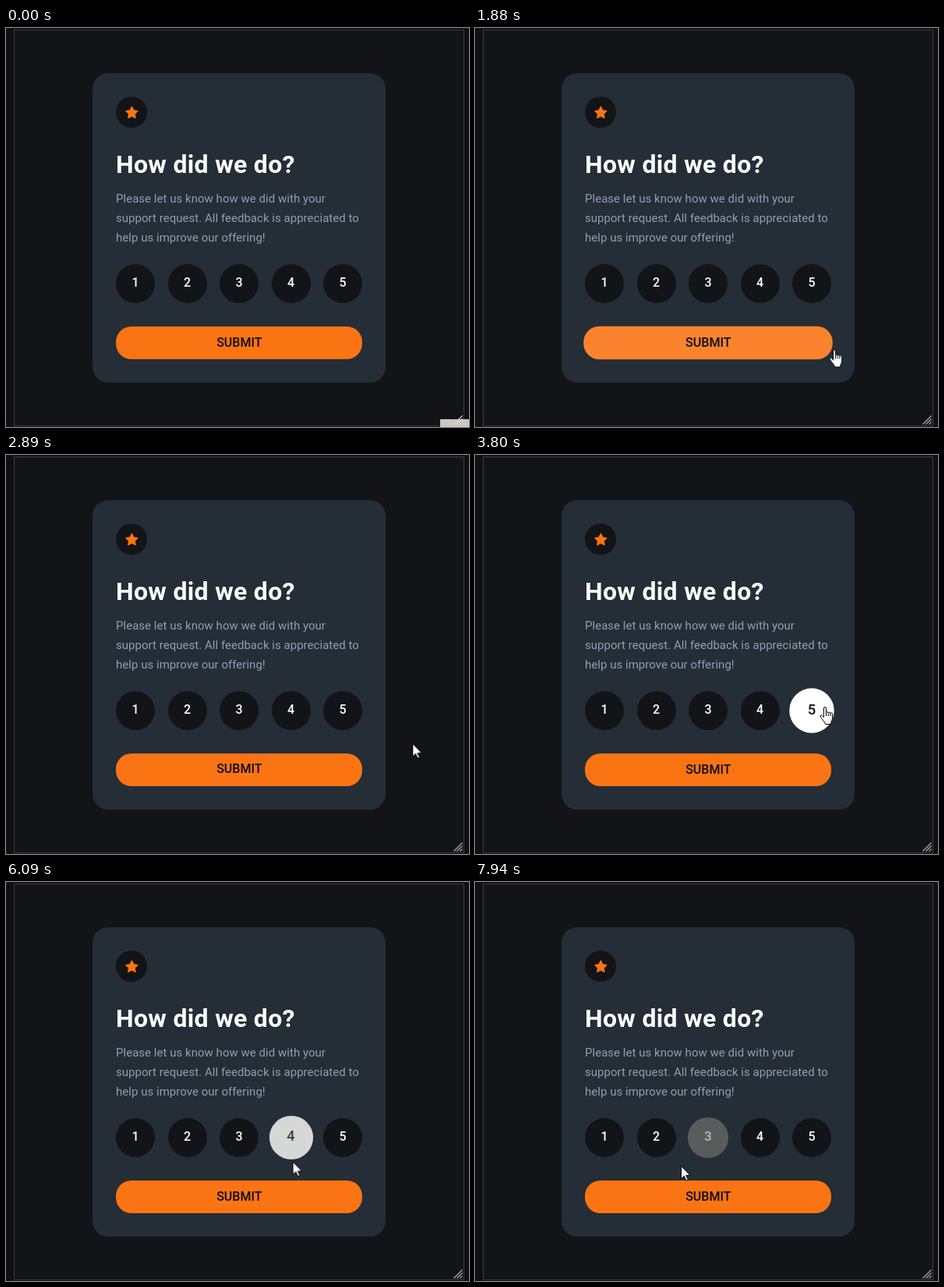
Write an HTML page that moves like this. It is 594 by 512 pixels and loops after 8000 ms.

```html
<!DOCTYPE html>
<html lang="en">
<head>
<meta charset="utf-8">
<title>Rating card</title>
<style>
  @property --hot { syntax: "<number>"; inherits: true; initial-value: 0; }
  @property --hand { syntax: "<number>"; inherits: true; initial-value: 0; }

  :root { --dark: #121417; --orange: #fb7413; --loop: 8s linear infinite; }
  html, body { margin: 0; width: 100%; height: 100%; overflow: hidden; background: #0f1013; }
  svg { display: block; }
  text { font-family: Roboto, "Open Sans", sans-serif; }

  .title { font-size: 32px; font-weight: 700; letter-spacing: .3px; fill: #fff; }
  .copy { font-size: 15px; letter-spacing: .03px; fill: #939db1; }

  .btn {
    --grow: .15; --base: var(--dark); --ink: #fff;
    transform-box: fill-box; transform-origin: center;
    transform: scale(calc(1 + var(--grow) * var(--hot)));
  }
  .btn rect, .btn circle { fill: color-mix(in srgb, #fff calc(var(--hot) * 100%), var(--base)); }
  .btn text {
    font-size: 16px; font-weight: 500; text-anchor: middle;
    fill: color-mix(in srgb, var(--dark) calc(var(--hot) * 100%), var(--ink));
  }
  .submit { --grow: .1; --base: var(--orange); --ink: #0c0d0f; animation: hot-submit var(--loop); }
  .five { animation: hot-five var(--loop); }
  .four { animation: hot-four var(--loop); }
  .three { animation: hot-three var(--loop); }

  /* each hover eases in and out over about 300 ms */
  @keyframes hot-submit {
    0% { --hot: 0; }
    23.1% { --hot: 0; animation-timing-function: ease; }
    26.85% { --hot: 1; }
    32.6% { --hot: 1; animation-timing-function: ease; }
    36.35%, 100% { --hot: 0; }
  }
  @keyframes hot-five {
    0% { --hot: 0; }
    43.5% { --hot: 0; animation-timing-function: ease; }
    47.25% { --hot: 1; }
    56.2% { --hot: 1; animation-timing-function: ease; }
    59.95%, 100% { --hot: 0; }
  }
  @keyframes hot-four {
    0% { --hot: 0; }
    63.6% { --hot: 0; animation-timing-function: ease; }
    67.1% { --hot: 1; }
    75.6% { --hot: 1; animation-timing-function: ease; }
    79.35%, 100% { --hot: 0; }
  }
  @keyframes hot-three {
    0% { --hot: 0; }
    84.63% { --hot: 0; animation-timing-function: ease; }
    87.9% { --hot: 1; }
    97.65% { --hot: 1; }
    99.25%, 100% { --hot: .3; }
  }

  .patch { animation: patch var(--loop); }
  @keyframes patch {
    0%, .8% { opacity: 1; }
    3.4%, 100% { opacity: 0; }
  }

  .cursor { animation: move var(--loop), swap 8s step-end infinite; }
  .arrow { opacity: calc(1 - var(--hand)); }
  .hand { opacity: var(--hand); }
  @keyframes move {
    0%, 6.6% { transform: translate(596px, 513px); }
    7% { transform: translate(588px, 506px); }
    10.2% { transform: translate(566px, 446px); }
    13.4%, 15.9% { transform: translate(552px, 405px); }
    16.6%, 17.4% { transform: translate(541px, 410px); }
    20.5% { transform: translate(505px, 415px); }
    23.1% { transform: translate(463px, 413px); }
    26.1%, 31.4% { transform: translate(449px, 409px); }
    32.6% { transform: translate(471px, 406px); }
    35% { transform: translate(523px, 378px); }
    37% { transform: translate(520px, 364px); }
    40.6% { transform: translate(482px, 334px); }
    43.5% { transform: translate(457px, 325px); }
    45.5%, 54% { transform: translate(449px, 323px); }
    56.2% { transform: translate(437px, 356px); }
    58.5% { transform: translate(405px, 364px); }
    61.5% { transform: translate(361px, 362px); }
    63.4%, 74.4% { transform: translate(377px, 346px); }
    75.6% { transform: translate(374px, 357px); }
    78% { transform: translate(345px, 364px); }
    81.5% { transform: translate(304px, 365px); }
    83.9% { transform: translate(295px, 353px); }
    84.8%, 85.6% { transform: translate(293px, 341px); }
    87.4%, 93.8% { transform: translate(291px, 347px); }
    97.6% { transform: translate(281px, 355px); }
    99.25%, 100% { transform: translate(264px, 364px); }
  }
  @keyframes swap {
    0%, 32.6%, 56.2%, 75.6%, 97.65% { --hand: 0; }
    23.1%, 43.5%, 63.3%, 84.5% { --hand: 1; }
  }
</style>
</head>
<body>
<svg width="594" height="512" viewBox="0 0 594 512">
  <rect x="10.5" y="2.5" width="577" height="508" fill="#121417" stroke="#3c3d40"/>
  <path d="M574.5 508.5l11-11M578.5 508.5l7-7M582.5 508.5l3-3" stroke="#b4b4b4" stroke-width="1.1"/>
  <g class="patch">
    <rect x="557" y="502" width="37" height="10" fill="#cbc8c3"/>
    <path d="M574.5 508.5l11-11M578.5 508.5l7-7" stroke="#e4e2df"/>
  </g>

  <rect x="111" y="58" width="376" height="397" rx="20" fill="#252d36"/>
  <circle cx="161" cy="108" r="20" fill="#121417"/>
  <path transform="translate(153 100.4)" fill="#fb7413" stroke="#fb7413" stroke-width="1.4" stroke-linejoin="round"
    d="M8.4.7l2.3 4.7 5.2.8-3.8 3.6.9 5.2-4.6-2.4-4.6 2.4.9-5.2L.9 6.2l5.2-.8z"/>

  <text class="title" x="141" y="186.3">How did we do?</text>
  <g class="copy">
    <text x="141" y="224">Please let us know how we did with your</text>
    <text x="141" y="249">support request. All feedback is appreciated to</text>
    <text x="141" y="274">help us improve our offering!</text>
  </g>

  <g class="btn"><circle cx="166" cy="328" r="25"/><text x="166" y="332">1</text></g>
  <g class="btn"><circle cx="233" cy="328" r="25"/><text x="232.5" y="332">2</text></g>
  <g class="btn three"><circle cx="299" cy="328" r="25"/><text x="299" y="332">3</text></g>
  <g class="btn four"><circle cx="366" cy="328" r="25"/><text x="365.5" y="332">4</text></g>
  <g class="btn five"><circle cx="432" cy="328" r="25"/><text x="432" y="332">5</text></g>
  <g class="btn submit">
    <rect x="141" y="383" width="316" height="42" rx="20"/>
    <text x="299.3" y="408.5">SUBMIT</text>
  </g>

  <g class="cursor" fill="#fff" stroke="#000" stroke-linejoin="round">
    <path class="arrow" d="M.5.5v16.4l3.8-3.6 2.6 5.8 2.5-1.1-2.6-5.6h5.2z"/>
    <g class="hand" transform="translate(-7 0)">
      <path d="M5.5 2a1.5 1.5 0 0 1 3 0v5.6a1.4 1.4 0 0 1 2.7.5 1.4 1.4 0 0 1 2.7.7 1.3 1.3 0 0 1 2.6.7v5c0 3-1.6 4-2 8h-7c-.5-3-4.5-6.5-6.3-9.800-.9-1.700.8-2.500 2-1.400l2.300 2.200z"/>
      <path d="M8.500 7.500v4.500M11.200 8.500v3.500M13.900 9v3" fill="none"/>
    </g>
  </g>
</svg>
</body>
</html>
```
